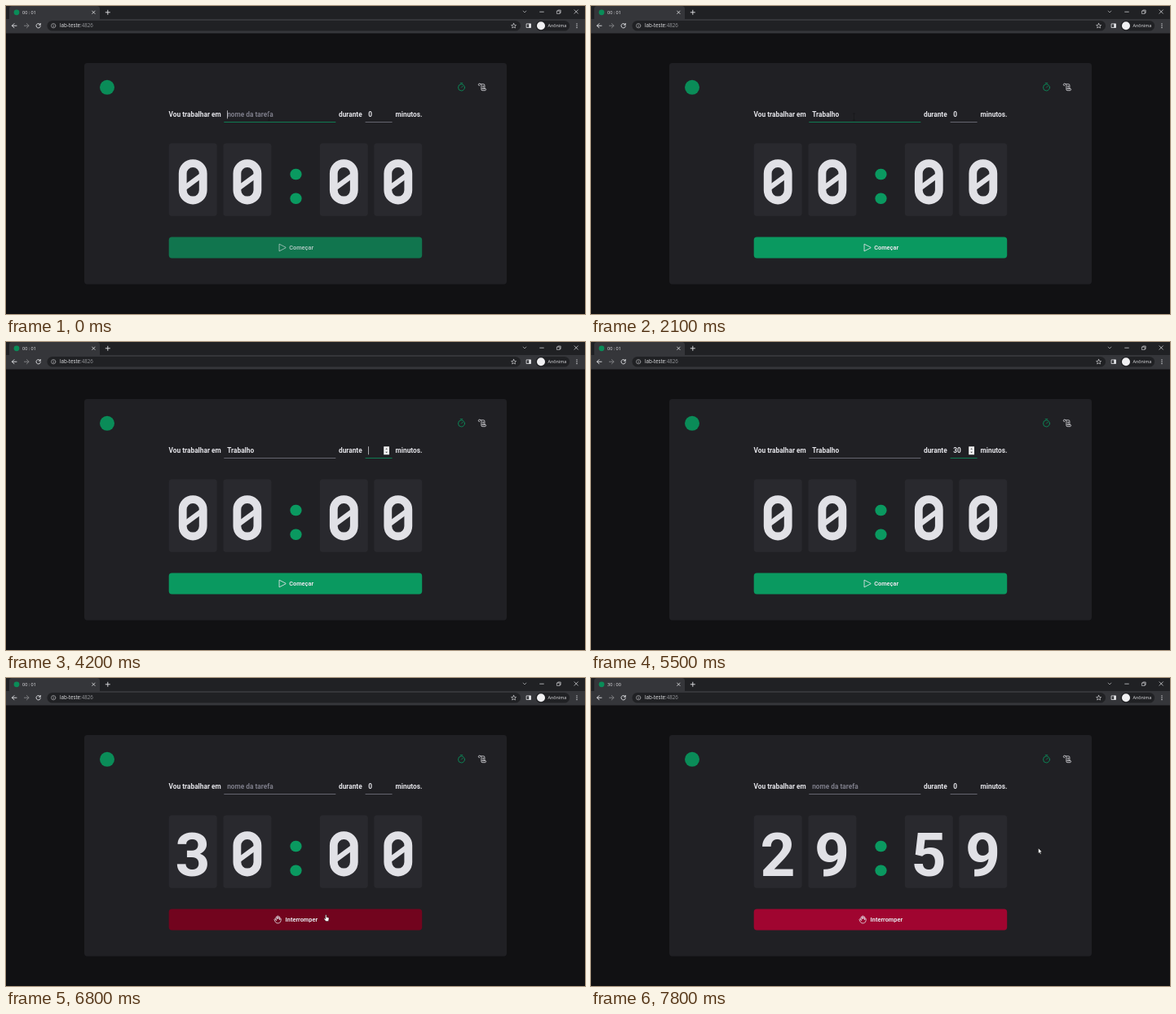
These frames come from a looping animation (710 by 378 pixels, 8000 ms). An HTML page with a canvas:

```html
<!DOCTYPE html>
<html lang="pt">
<head>
<meta charset="utf-8">
<title>Timer</title>
<style>
html, body { margin: 0; width: 100%; height: 100%; overflow: hidden; background: #111113; }
canvas { display: block; width: 710px; height: 378px; }
</style>
</head>
<body>
<canvas id="stage"></canvas>
<script>
const W = 710, H = 378, LOOP = 8000;
const canvas = document.getElementById('stage');
const ctx = canvas.getContext('2d');
const dpr = window.devicePixelRatio || 1;
canvas.width = W * dpr;
canvas.height = H * dpr;

const UI = '"Open Sans", sans-serif', APP = 'Roboto, sans-serif';
const GREEN = [10, 153, 96], GREEN_DARK = [6, 108, 68];
const RED = [160, 5, 48], RED_DARK = [114, 4, 30];
const LIGHT = '#e4e4e9', GREY = '#7c7c88', CARD = '#202024';
const rgb = c => `rgb(${c.map(Math.round).join()})`;
const mix = (a, b, p) => a.map((v, i) => v + (b[i] - v) * p);
const ramp = (t, a, b) => Math.min(1, Math.max(0, (t - a) / (b - a)));
const during = (t, spans) => spans.some(([a, b]) => t >= a && t < b);

const TASK = 'Trabalho';
const KEY_TIMES = [100, 500, 600, 800, 900, 1200, 1400, 1600];
const FOCUS_MINUTES = 3000, PRESS = 6500, START = 6800, TICK = 7800;
const ENTER = 5900, LEAVE = 7450;
const TASK_CARET = [[0, 2100], [2600, FOCUS_MINUTES]];
const MINUTES_CARET = [[3000, 3600], [4200, 4600], [4800, 5500], [6000, PRESS]];
const MOUSE = [
  [5700, 462, 132], [5900, 401, 283], [6100, 393.2, 287.5], [6200, 392.3, 290.5],
  [7300, 392.3, 290.5], [7450, 428, 282], [7800, 548.6, 209]
];

function box(x, y, w, h, r, fill) {
  ctx.fillStyle = fill;
  ctx.beginPath();
  ctx.roundRect(x, y, w, h, r);
  ctx.fill();
}

function disc(x, y, r, fill) {
  ctx.fillStyle = fill;
  ctx.beginPath();
  ctx.arc(x, y, r, 0, Math.PI * 2);
  ctx.fill();
}

function text(s, x, y, size, fill, family = APP, weight = 700, align = 'left') {
  ctx.font = `${weight} ${size}px ${family}`;
  ctx.textAlign = align;
  ctx.fillStyle = fill;
  ctx.fillText(s, x, y);
  return ctx.measureText(s).width;
}

// Path in coordinates local to (x, y)
function icon(d, x, y, stroke, width = 0.8, fill) {
  const path = new Path2D(d);
  ctx.save();
  ctx.translate(x, y);
  ctx.lineWidth = width;
  ctx.lineJoin = ctx.lineCap = 'round';
  if (fill) { ctx.fillStyle = fill; ctx.fill(path); }
  if (stroke) { ctx.strokeStyle = stroke; ctx.stroke(path); }
  ctx.restore();
}

function drawBrowser(title) {
  const ink = '#e4e5e8';
  box(0, 0, W, 17, 0, '#202124');
  box(4, 0, 111, 20, 3.5, '#35363a');
  box(0, 16, W, 17.5, 0, '#35363a');
  disc(13, 7.8, 3.4, '#0a8c58');
  text(title, 20, 9.9, 5.5, ink, UI, 400);
  icon('M-1.7-1.7L1.7 1.7M1.7-1.7L-1.7 1.7', 107.4, 7.8, ink);
  icon('M-2.6 0H2.6M0-2.6V2.6', 124.8, 7.8, ink, 0.9);
  icon('M-1.9-.9L0 1L1.9-.9', 636, 7, '#b8b9bc', 0.7);
  icon('M-2.3 0H2.3', 657, 7.2, ink, 0.7);
  icon('M-2.2-1H1.2V2.4H-2.2ZM-1.2-1V-2H2.2V1.4H1.2', 678, 7, ink, 0.6);
  icon('M-2.2-2.2L2.2 2.2M2.2-2.2L-2.2 2.2', 699.2, 7, ink, 0.7);

  icon('M2.8 0H-2.8M-.2-2.6L-2.8 0L-.2 2.6', 10.2, 24.2, ink, 0.9);
  icon('M-2.8 0H2.8M.2-2.6L2.8 0L.2 2.6', 25.2, 24.2, '#86878a', 0.9);
  icon('M2.1-1.6A2.7 2.7 0 1 0 2.6.6M2.5-2.8V-1H.7', 39.8, 24.2, ink, 0.9);
  box(50.5, 18, 580.5, 12.6, 6.3, '#202124');
  icon('M2.7 0A2.7 2.7 0 1 1-2.7 0A2.7 2.7 0 1 1 2.7 0M0-.2V1.4M0-1.4V-1.3', 58.2, 24.2, '#c4c5c8', 0.6);
  const w = text('lab-teste', 66, 26.4, 6.2, ink, UI, 400);
  text(':4826', 66 + w, 26.4, 6.2, '#94969a', UI, 400);
  icon('M0-3L.9-1L3-.8L1.4.6L1.9 2.7L0 1.6L-1.9 2.7L-1.4.6L-3-.8L-.9-1Z', 622.6, 24.3, ink, 0.6);
  icon('M-2.5-2.3H2.5V2.3H-2.5Z', 641, 24.2, ink, 0.8);
  box(641.2, 21.8, 2.4, 4.8, 0, ink);
  box(649.6, 18, 41.5, 12.6, 6.3, '#202124');
  disc(656, 24.2, 5, '#f0f0f2');
  text('Anônima', 664.6, 26.1, 5.4, ink, UI, 400);
  for (const y of [21.9, 24.2, 26.5]) disc(700, y, 0.65, ink);
}

function drawHeader() {
  disc(124, 99.8, 9, '#0a8c58');
  icon('M4 0A4 4 0 1 1-4 0A4 4 0 1 1 4 0M0 0L1.7-1.7M-1.3-5.3H1.3', 558.5, 100, rgb(GREEN), 0.8);
  icon('M-3.2-1.9A1.3 1.3 0 1 1-2-3.8H1.9A1.2 1.2 0 0 1 3.1-2.6V1.8M-2-3.8Q-.9-3.5-.9-2.4V2.8A1.2 1.2 0 0 0 .3 4H3.6A1.2 1.2 0 0 0 4.4 1.9H0M.8-1.4H1.8M.8.3H1.8', 583.8, 99.7, LIGHT, 0.8);
}

function drawForm(t) {
  const y = 136.3, size = 8.32;
  const onTask = t < FOCUS_MINUTES, onMinutes = !onTask && t < PRESS;
  text('Vou trabalhar em', 199.6, y, size, LIGHT);
  text('durante', 408, y, size, LIGHT);
  text('minutos.', 477.6, y, size, LIGHT);

  const task = t < START ? TASK.slice(0, KEY_TIMES.filter(k => t >= k).length) : '';
  const taskWidth = task ? text(task, 271.2, y - 0.4, size, LIGHT) : 0;
  if (!task) text('nome da tarefa', 271.2, y - 0.4, size, GREY);
  box(267.3, 141.9, 137, 0.95, 0, onTask ? rgb(GREEN) : GREY);
  if (during(t, TASK_CARET)) box(271.2 + taskWidth, 128.3, 0.7, 10, 0, LIGHT);

  const minutes = t < 4000 || t >= START ? '0' : t < 4800 ? '' : t < 4900 ? '3' : '30';
  const minWidth = text(minutes, 444.3, y - 0.4, size, LIGHT);
  box(440.6, 141.9, 33, 0.95, 0, onMinutes ? rgb(GREEN) : GREY);
  if (during(t, MINUTES_CARET)) box(444.2 + minWidth, 128.3, 0.7, 10, 0, LIGHT);

  if (t >= 2700 && t < PRESS) {
    box(463.2, 128.2, 6.8, 10, 0.3, '#f1f1f1');
    icon('M-1.3.6L0-.9L1.3.6Z', 466.6, 131.2, null, 0, '#46464a');
    icon('M-1.3-.6L0 .9L1.3-.6Z', 466.6, 135.4, null, 0, '#46464a');
  }
}

function drawZero(x) {
  ctx.save();
  ctx.translate(x, 215.8);
  ctx.strokeStyle = '#e1e1e6';
  ctx.lineWidth = 9.8;
  ctx.beginPath();
  ctx.roundRect(-12.5, -22.7, 25, 45.4, 12.4);
  ctx.stroke();
  ctx.lineWidth = 6.4;
  ctx.beginPath();
  ctx.moveTo(-10, 7.2);
  ctx.lineTo(10, -7.6);
  ctx.stroke();
  ctx.restore();
}

function drawClock(digits) {
  [199.7, 266.4, 384.8, 451.3].forEach((x, i) => {
    box(x, 168.5, 59, 89.3, 3.7, '#29292e');
    const mid = x + 29.5;
    if (digits[i] === '0') drawZero(mid);
    else text(digits[i], mid - 0.3, 242.8, 75, '#e1e1e6', APP, 700, 'center');
  });
  for (const y of [206.5, 236.2]) {
    box(348.4, y - 6.7, 14.2, 13.4, 6.7, rgb(GREEN));
  }
}

function drawButton(t) {
  const running = t >= START;
  if (t >= PRESS && !running) box(198.7, 282.5, 312.5, 27.9, 4.4, rgb(GREEN));
  const hover = ramp(t, ENTER, 6100) - ramp(t, LEAVE, 7650);
  const fill = running ? mix(RED, RED_DARK, hover) : mix(GREEN, GREEN_DARK, hover);
  ctx.save();
  ctx.globalAlpha = 0.7 + 0.3 * ramp(t, 50, 300);
  box(199.7, 283.5, 310.5, 25.9, 3.7, rgb(fill));
  if (running) {
    icon('M-2.4.5V-2.4A.8.8 0 0 1-.8-2.4V-.6V-3.7A.8.8 0 0 1 .8-3.7V-.7V-2.8A.8.8 0 0 1 2.4-2.8V.5V-.9A.8.8 0 0 1 3.9-.9V1A3.8 3.8 0 0 1-3 3L-4.2.4A.9.9 0 0 1-2.6-.4L-1.6 1.3', 333.3, 296.4, LIGHT, 0.8);
    text('Interromper', 342.6, 299.1, 7.4, LIGHT);
  } else {
    icon('M-3.6-4.2L4-.3Q4.4 0 4 .3L-3.6 4.2Z', 339, 296.5, LIGHT, 0.85);
    text('Começar', 347.2, 299.1, 7.4, LIGHT);
  }
  ctx.restore();
}

function mouseAt(t) {
  const i = MOUSE.findIndex(k => k[0] > t);
  if (i < 0) return MOUSE[MOUSE.length - 1].slice(1);
  const [a, b] = [MOUSE[i - 1], MOUSE[i]];
  return mix(a.slice(1), b.slice(1), ramp(t, a[0], b[0]));
}

function drawMouse(t) {
  if (t < 2700) {
    const x = 322.5 + 132 * ramp(t, 2350, 2700);
    icon('M-1.2-4H1.2M0-4V4M-1.2 4H1.2', x, 136 - 4 * ramp(t, 2350, 2700), '#17171a', 0.6);
  }
  if (t < MOUSE[0][0]) return;
  const [x, y] = mouseAt(t);
  if (t >= ENTER && t < LEAVE) {
    icon('M-.6.6A.6.6 0 0 1 .7.6V3L3 3.5Q3.8 3.8 3.7 4.8L3.1 8H-.1L-2.3 5.2Q-2.3 4.3-1.4 4.6L-.6 5.2Z', x, y, '#111', 0.4, '#fff');
  } else {
    icon('M0 0V6.2L1.4 5L2.4 7.2L3.4 6.7L2.4 4.6H4.3Z', x, y, '#111', 0.4, '#fff');
  }
}

function draw(t) {
  ctx.setTransform(dpr, 0, 0, dpr, 0, 0);
  box(0, 0, W, H, 0, '#111113');
  drawBrowser(t < 6900 ? '00 : 01' : '30 : 00');
  box(96, 70, 518, 271.5, 3.7, CARD);
  drawHeader();
  drawForm(t);
  drawClock(t < START ? '0000' : t < TICK ? '3000' : '2959');
  drawButton(t);
  drawMouse(t);
}

const begin = performance.now();
function loop() {
  draw((performance.now() - begin) % LOOP);
  requestAnimationFrame(loop);
}
loop();
</script>
</body>
</html>
```
